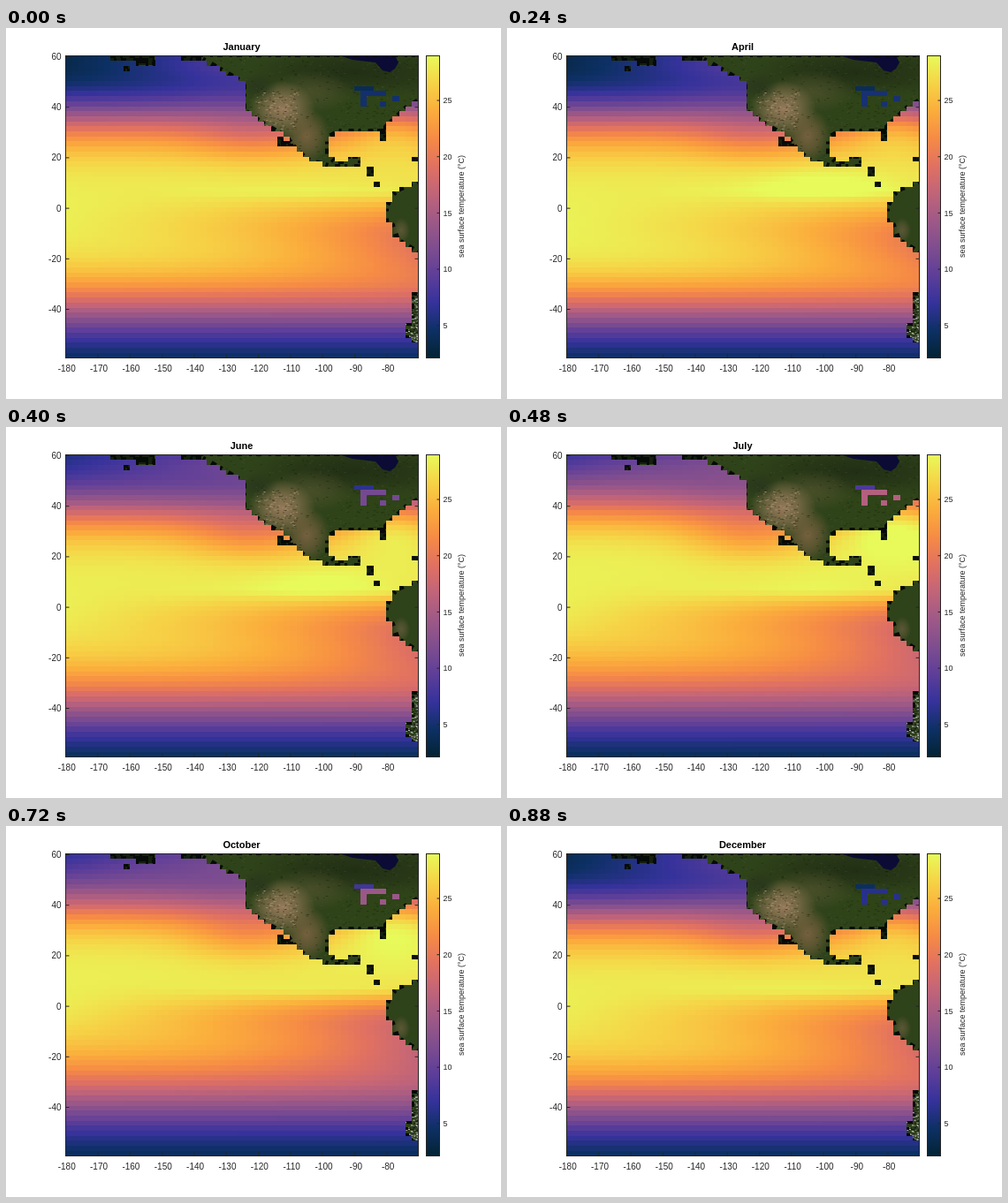
Animation of 560 by 420 pixels, one loop 0.96 s. Source, as an HTML page with a canvas:

```html
<!DOCTYPE html>
<html lang="en">
<head>
<meta charset="utf-8">
<title>Sea surface temperature</title>
<style>
  html, body { margin: 0; width: 100%; height: 100%; overflow: hidden; background: #fff; }
  canvas { display: block; }
</style>
</head>
<body>
<canvas id="stage" width="560" height="420"></canvas>
<script>
const ctx = document.getElementById('stage').getContext('2d');
const MONTHS = ['January', 'February', 'March', 'April', 'May', 'June', 'July',
  'August', 'September', 'October', 'November', 'December'];
const STEP = 80;
const LEFT = 67.5, TOP = 31.5, WIDTH = 399, HEIGHT = 342;
const COLS = 55, ROWS = 60, CELL_W = WIDTH / COLS, CELL_H = HEIGHT / ROWS;
const FONT = '"Liberation Sans", Arial, sans-serif';

const THERMAL = ['#032333', '#0d3064', '#35329b', '#5d3e99', '#7e4d8f', '#9e5987',
  '#c16479', '#e17161', '#f68b45', '#fbad3c', '#f6d346', '#e7fa5a'];
const T_MIN = 2.1, T_MAX = 29;

const NORTH_AMERICA = new Path2D(`M213 30L269 62V93L292 109L317 123L329 139L343 150L368 157H401V145H387V151H372
  L364 144V124L376 117H430V112L452 91L470 80V30Z`);
const SOUTH_AMERICA = new Path2D('M470 172L459 176L443 183L436 190L430 203V219L437 223L443 240L470 256Z');
const CHILE = new Path2D('M459 300H470V357H459V351H452V334H459Z');
const HUDSON_BAY = new Path2D('M377 31L392 36L418 39L426 48L434 50L440 46L444 39L440 31Z');
const ISLANDS = new Path2D(`M118 31h50v6h-50zM132 43h8v6h-8zM147 37h21v5h-21zM198 31h20v6h-20z
  M307 123h7v11h-7zM314 128h8v6h-8zM423 117h7v11h-7zM409 157h7v11h-7zM416 174h7v6h-7zM459 146h8v5h-8z`);
const LAKES = new Path2D('M394 66h22v6h-22zM401 71h30v6h-30zM401 77h7v11h-7zM423 83h8v6h-8zM438 77h8v6h-8z');
const LANDS = [NORTH_AMERICA, SOUTH_AMERICA, CHILE, ISLANDS];

const clamp = (v, lo, hi) => Math.min(hi, Math.max(lo, v));
const bell = (v, centre, width) => Math.exp(-(((v - centre) / width) ** 2));
const rise = (v, centre, width) => 1 / (1 + Math.exp((centre - v) / width));
const yearly = (month, peak) => Math.cos((month - peak) * Math.PI / 6);

// The northern summer is shorter and sharper than the winter.
const northSeason = m => yearly(m, 7.3) + .25 * yearly(2 * m, 14.6);
const southSeason = m => yearly(m, 2);

function seaTemperature(lat, lon, month) {
  const east = (lon + 180) / 110;
  const zonal = 1.2 + 27.5 * rise(lat, -40.3, 9.4) - 24.5 * rise(lat, 38, 7);
  const alaska = 5 * Math.min(1, 2 * east) * bell(lat, 58, 9);
  const atlantic = 4 * bell(lat, 33, 11) * bell(lon, -78, 15);
  const california = 3.3 * bell(lat, 28, 10) * bell(lon, -122, 20);
  const coldTongue = 5 * east * bell(lat, -5, 10);
  const humboldt = 7 * east ** 2.5 * bell(lat, -17, 14);
  const warmBand = 1.2 * bell(lat, 6, 3) * clamp(2 * east - .4, 0, 1);
  const warmPool = 1.9 * Math.max(0, yearly(month, 3.5)) * bell(lat, 9, 6) * bell(lon, -100, 20);
  const northSwing = 5.4 * bell(lat, 43, 20) * (1 - .35 * bell(lon, -125, 25));
  const southSwing = 2.7 * bell(lat, -30, 20) + 2 * east * bell(lat, -3, 8);
  return zonal + alaska + atlantic - california - coldTongue - humboldt + warmBand + warmPool +
    northSwing * northSeason(month) + southSwing * southSeason(month);
}

function lakeTemperature(row, month) {
  return row > 6 ? 10 + 7 * northSeason(month) : 6 + 3 * northSeason(month);
}

const channels = hex => [1, 3, 5].map(i => parseInt(hex.slice(i, i + 2), 16));

function colour(temp) {
  const x = clamp((temp - T_MIN) / (T_MAX - T_MIN), 0, 1) * (THERMAL.length - 1);
  const i = Math.min(Math.floor(x), THERMAL.length - 2);
  const next = channels(THERMAL[i + 1]);
  return `rgb(${channels(THERMAL[i]).map((v, k) => Math.round(v + (next[k] - v) * (x - i)))})`;
}

// Every grid cell whose centre is on water.
const waterCells = [];
for (let row = 0; row < ROWS; row++) {
  for (let col = 0; col < COLS; col++) {
    const x = LEFT + (col + .5) * CELL_W, y = TOP + (row + .5) * CELL_H;
    const lake = ctx.isPointInPath(LAKES, x, y);
    if (lake || !LANDS.some(land => ctx.isPointInPath(land, x, y))) waterCells.push({ col, row, lake });
  }
}

function drawWater(month) {
  for (const { col, row, lake } of waterCells) {
    const x = Math.round(LEFT + col * CELL_W), y = Math.round(TOP + row * CELL_H);
    ctx.fillStyle = colour(lake ? lakeTemperature(row, month)
      : seaTemperature(59 - 2 * row, -179 + 2 * col, month));
    ctx.fillRect(x, y, Math.round(LEFT + (col + 1) * CELL_W) - x, Math.round(TOP + (row + 1) * CELL_H) - y);
  }
}

function glow(x, y, rx, ry, rgb, alpha) {
  ctx.save();
  ctx.translate(x, y);
  ctx.scale(rx, ry);
  const g = ctx.createRadialGradient(0, 0, 0, 0, 0, 1);
  g.addColorStop(0, `rgba(${rgb},${alpha})`);
  g.addColorStop(.5, `rgba(${rgb},${alpha * .6})`);
  g.addColorStop(1, `rgba(${rgb},0)`);
  ctx.fillStyle = g;
  ctx.fillRect(-1, -1, 2, 2);
  ctx.restore();
}

function speckle(x, y, w, h, count, fills) {
  let seed = 7;
  const random = () => (seed = seed * 16807 % 2147483647) / 2147483647;
  for (let i = 0; i < count; i++) {
    ctx.fillStyle = fills[i % fills.length];
    ctx.fillRect(x + random() * w, y + random() * h, 1 + random() * 2, 1);
  }
}

function drawLand() {
  ctx.fillStyle = '#2f431a';
  ctx.fillRect(LEFT, TOP, WIDTH, HEIGHT);
  glow(395, 50, 120, 30, '28,38,18', .7);
  glow(415, 90, 60, 30, '46,68,22', .8);
  glow(345, 72, 50, 24, '82,84,46', .7);
  glow(312, 92, 38, 32, '150,122,90', 1);
  glow(340, 122, 26, 32, '125,100,66', .9);
  glow(285, 66, 22, 16, '40,52,28', .8);
  glow(447, 229, 10, 14, '110,95,65', .7);
  speckle(215, 32, 250, 125, 700, ['rgba(18,28,12,.4)', 'rgba(115,112,75,.2)']);
  speckle(282, 72, 48, 44, 160, ['rgba(195,165,130,.5)', 'rgba(55,52,30,.6)']);
  speckle(452, 300, 14, 57, 180, ['#8e928b', '#28331f', '#101610', '#c5c8c2']);
  ctx.fillStyle = '#0b0b35';
  ctx.fill(HUDSON_BAY);
  ctx.fillStyle = 'rgba(6,14,8,.65)';
  ctx.fill(ISLANDS);

  ctx.strokeStyle = '#060a08';
  ctx.lineWidth = 6;
  ctx.setLineDash([6, 5, 3, 8]);
  LANDS.forEach(land => ctx.stroke(land));
  ctx.setLineDash([]);
}

function text(string, x, y, align = 'center', font = '10px') {
  ctx.font = `${font} ${FONT}`;
  ctx.textAlign = align;
  ctx.fillText(string, x, y);
}

function line(x, y, dx, dy) {
  ctx.beginPath();
  ctx.moveTo(x, y);
  ctx.lineTo(x + dx, y + dy);
  ctx.stroke();
}

function drawMap(month) {
  ctx.save();
  ctx.beginPath();
  ctx.rect(68, 32, 398, 342);
  ctx.clip();
  drawLand();
  drawWater(month);
  ctx.restore();
}

function drawAxes(month) {
  ctx.strokeStyle = ctx.fillStyle = '#262626';
  ctx.lineWidth = 1;
  ctx.strokeRect(LEFT, TOP, WIDTH, HEIGHT);
  for (let i = 0; i <= 10; i++) {
    const x = LEFT + i * 36.35;
    line(x, 373.5, 0, -4);
    text(-180 + 10 * i, x + 1.2, 388.5);
  }
  for (let i = 0; i < 6; i++) {
    const y = TOP + 1 + i * 57.2;
    line(LEFT, y, 4, 0);
    line(466.5, y, -4, 0);
    text(60 - 20 * i, 62.5, y + 3.5, 'right');
  }
}

function drawColourBar() {
  const bar = ctx.createLinearGradient(0, 373.5, 0, TOP);
  THERMAL.forEach((hex, i) => bar.addColorStop(i / (THERMAL.length - 1), hex));
  ctx.fillStyle = bar;
  ctx.fillRect(475.5, TOP, 15, HEIGHT);
  ctx.strokeRect(475.5, TOP, 15, HEIGHT);
  ctx.fillStyle = '#262626';
  for (let t = 5; t <= 25; t += 5) {
    const y = 400.5 - t * 12.74;
    line(490.5, y, -3, 0);
    text(t, 494.5, y + 3.2, 'left', '9px');
  }
  ctx.save();
  ctx.translate(518, 202);
  ctx.rotate(-Math.PI / 2);
  text('sea surface temperature (°C)', 0, 0, 'center', '9px');
  ctx.restore();
}

let shown = -1;
function frame() {
  const month = Math.floor(performance.now() / STEP) % MONTHS.length;
  if (month !== shown) {
    shown = month;
    ctx.fillStyle = '#fff';
    ctx.fillRect(0, 0, 560, 420);
    drawMap(month);
    drawAxes();
    drawColourBar();
    ctx.fillStyle = '#000';
    text(MONTHS[month], 266.5, 25, 'center', 'bold 11px');
  }
  requestAnimationFrame(frame);
}
frame();
</script>
</body>
</html>
```
